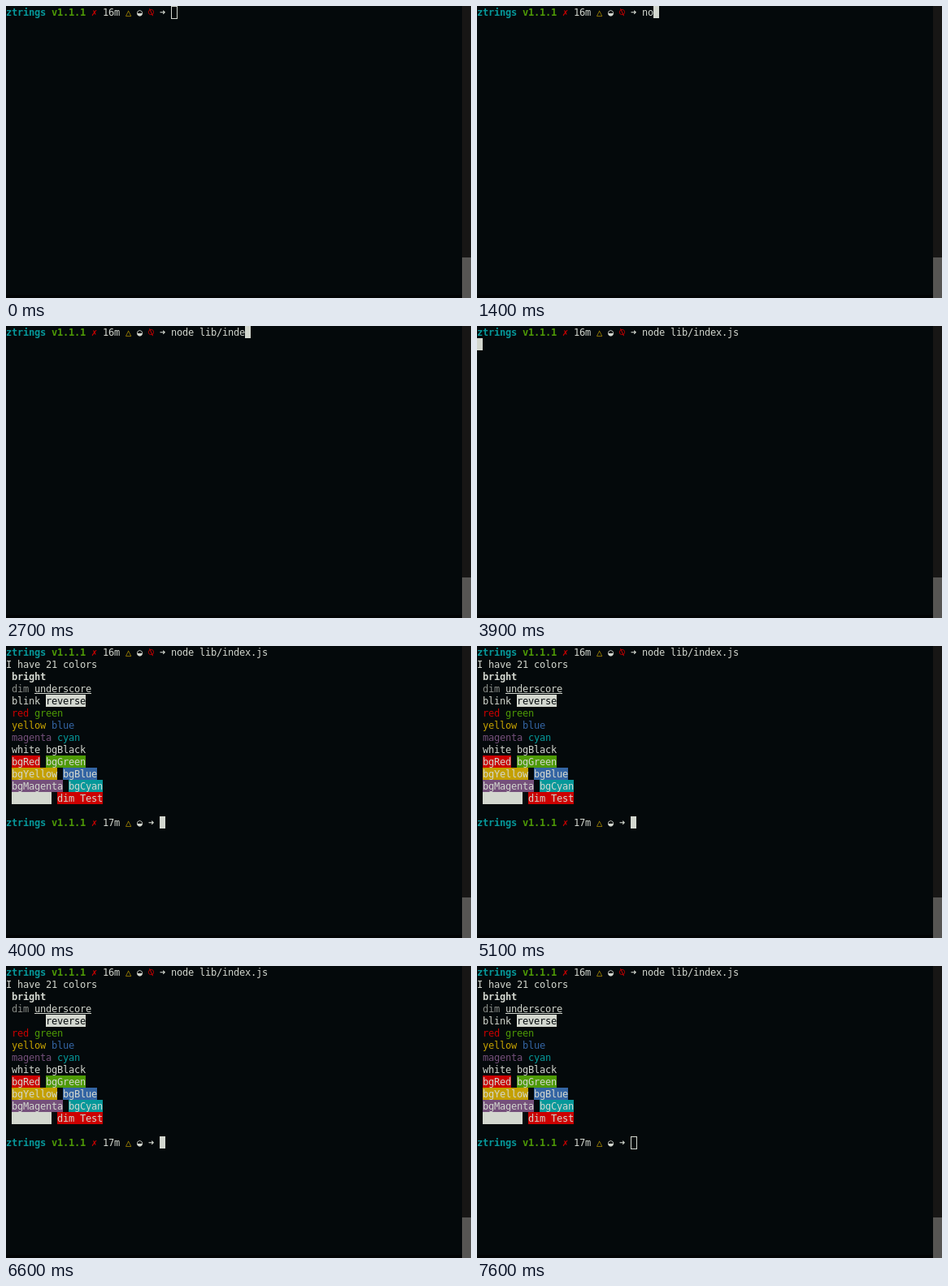
Recreate the animation shown at these times as an HTML page. Size 572 by 360 pixels, loop 7.7 s.

```html
<!DOCTYPE html>
<html lang="en">
<head>
<meta charset="utf-8">
<title>Terminal colors</title>
<style>
  html, body { margin: 0; width: 100%; height: 100%; overflow: hidden; background: #04090b; }
  svg { display: block; width: 100vw; height: 100vh; }
  text { font: 12px "DejaVu Sans Mono", "DejaVu Sans", monospace; white-space: pre; }
  .bold { font-weight: bold; }
</style>
</head>
<body>
<svg id="stage" viewBox="0 0 572 360">
  <rect width="572" height="360" fill="#04090b"/>
  <rect y="356" width="561" height="4" fill="#020405"/>
  <rect x="561" width="11" height="360" fill="#171615"/>
  <rect x="561" y="310" width="11" height="50" fill="#565553"/>
</svg>
<script>
const LOOP = 7700, CELL_W = 7, CELL_H = 15, BASELINE = 12;
const BG = '#04090b', RED = '#cc0000', GREEN = '#4e9a06', YELLOW = '#c4a000', BLUE = '#3465a4',
      MAGENTA = '#75507b', CYAN = '#06989a', WHITE = '#d3d7cf', DIM = '#8c8f8a';
const stage = document.getElementById('stage');

function add(parent, tag, attrs) {
  const el = document.createElementNS('http://www.w3.org/2000/svg', tag);
  for (const key in attrs) el.setAttribute(key, attrs[key]);
  parent.appendChild(el);
  return el;
}

// Text on the character grid, with optional background, weight and underline.
function put(parent, row, col, str, fill = WHITE, { bg, bold, underline } = {}) {
  const x = col * CELL_W, y = row * CELL_H, width = str.length * CELL_W;
  if (bg) add(parent, 'rect', { x, y, width, height: CELL_H, fill: bg });
  const el = add(parent, 'text', {
    x: Array.from(str, (_, i) => x + i * CELL_W).join(' '),
    y: y + BASELINE, fill, class: bold ? 'bold' : ''
  });
  el.textContent = str;
  if (underline) add(parent, 'rect', { x, y: y + 13, width, height: 1, fill });
  return el;
}

function prompt(parent, row, age, failed) {
  put(parent, row, 0, 'ztrings', CYAN, { bold: true });
  put(parent, row, 8, 'v1.1.1', GREEN, { bold: true });
  put(parent, row, 15, '✗', RED);
  put(parent, row, 17, age);
  put(parent, row, 21, '△', YELLOW);
  put(parent, row, 23, '◒');
  if (failed) put(parent, row, 25, '⍉', RED);
  put(parent, row, failed ? 27 : 25, '➜');
}

const COMMAND = 'node lib/index.js';
prompt(stage, 0, '16m', true);
const command = put(stage, 0, 29, COMMAND);

const output = add(stage, 'g', {});
put(output, 1, 0, 'I have 21 colors');
put(output, 2, 1, 'bright', WHITE, { bold: true });
put(output, 3, 1, 'dim', DIM);
put(output, 3, 5, 'underscore', WHITE, { underline: true });
const blink = put(output, 4, 1, 'blink');
put(output, 4, 7, 'reverse', BG, { bg: WHITE });
put(output, 5, 1, 'red', RED);
put(output, 5, 5, 'green', GREEN);
put(output, 6, 1, 'yellow', YELLOW);
put(output, 6, 8, 'blue', BLUE);
put(output, 7, 1, 'magenta', MAGENTA);
put(output, 7, 9, 'cyan', CYAN);
put(output, 8, 1, 'white');
put(output, 8, 7, 'bgBlack');
put(output, 9, 1, 'bgRed', WHITE, { bg: RED });
put(output, 9, 7, 'bgGreen', WHITE, { bg: GREEN });
put(output, 10, 1, 'bgYellow', WHITE, { bg: YELLOW });
put(output, 10, 10, 'bgBlue', WHITE, { bg: BLUE });
put(output, 11, 1, 'bgMagenta', WHITE, { bg: MAGENTA });
put(output, 11, 11, 'bgCyan', WHITE, { bg: CYAN });
put(output, 12, 1, 'bgWhite', WHITE, { bg: WHITE });
put(output, 12, 9, 'dim Test', WHITE, { bg: RED });
prompt(output, 14, '17m', false);

const block = add(stage, 'rect', { width: CELL_W, height: CELL_H, fill: WHITE });
const frame = add(stage, 'rect', { width: CELL_W, height: CELL_H, fill: 'none', stroke: WHITE });

// [time, characters typed]
const KEYS = [[1300, 1], [1400, 2], [1500, 3], [1600, 5], [1700, 6], [1900, 8], [2100, 9],
  [2500, 11], [2600, 12], [2700, 13], [2900, 14], [3000, 15], [3100, 16], [3200, 17]];
const FOCUS = 600, ENTER = 3900, PRINT = 4000, BLUR = 7600, HALF = 600, TEXT_BLINK = 4200;

const show = (el, on) => el.setAttribute('visibility', on ? 'inherit' : 'hidden');

function draw(t) {
  let typed = 0, reset = FOCUS;
  for (const [at, count] of KEYS) if (t >= at) { typed = count; reset = at; }
  if (t >= ENTER) reset = ENTER;

  command.textContent = COMMAND.slice(0, typed);
  show(output, t >= PRINT);
  show(blink, t < TEXT_BLINK || Math.floor((t - TEXT_BLINK) / HALF) % 2 === 1);

  const [row, col] = t >= PRINT ? [14, 27] : t >= ENTER ? [1, 0] : [0, 29 + typed];
  const x = col * CELL_W, y = row * CELL_H;
  const focused = t >= FOCUS && t < BLUR;
  block.setAttribute('x', x);
  block.setAttribute('y', y);
  frame.setAttribute('x', x + 0.5);
  frame.setAttribute('y', y + 0.5);
  show(frame, !focused);
  show(block, focused && Math.floor((t - reset) / HALF) % 2 === 0);
}

const start = performance.now();
function tick() {
  draw((performance.now() - start) % LOOP);
  requestAnimationFrame(tick);
}
tick();
</script>
</body>
</html>
```
